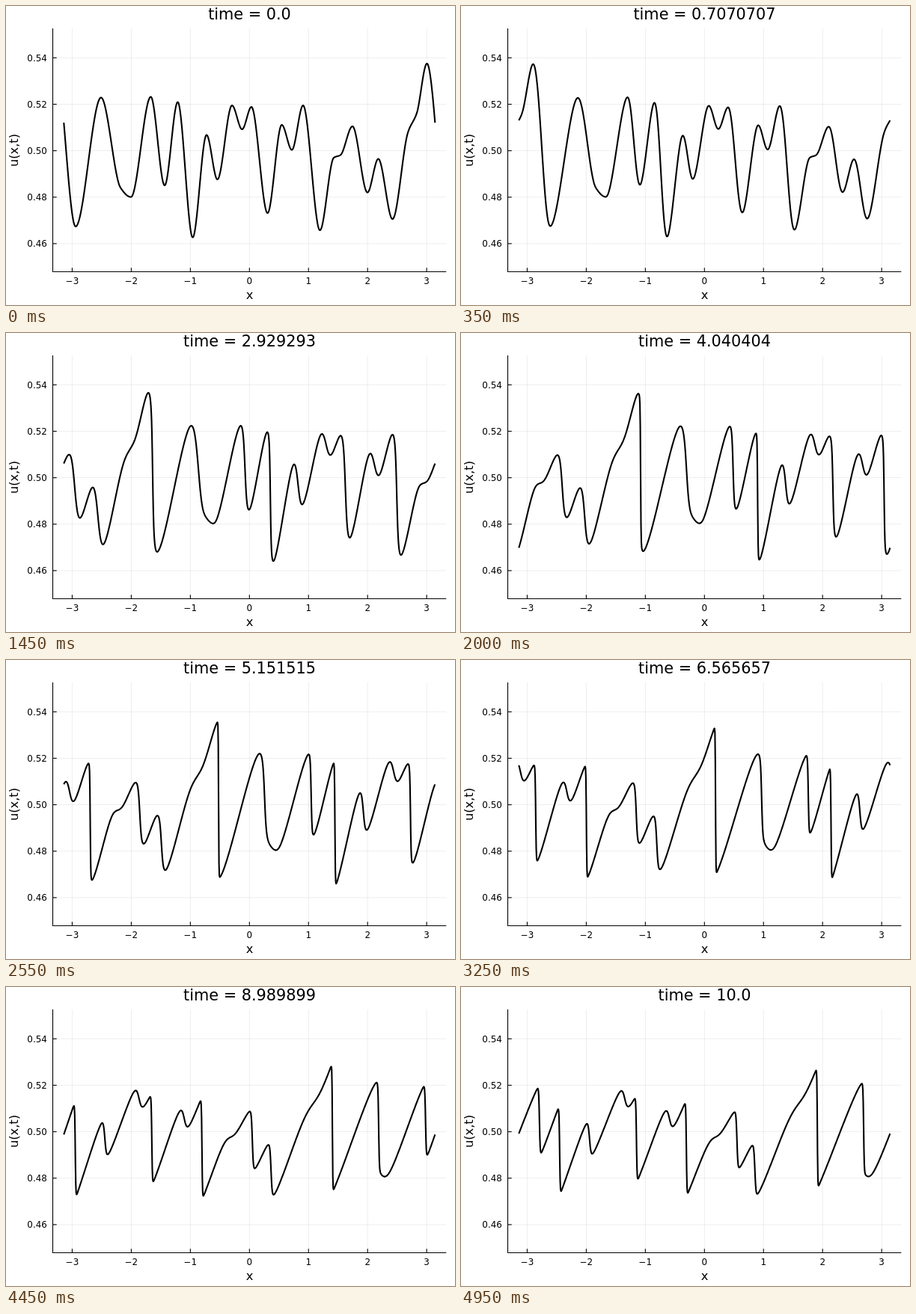
An HTML page for the animation above (5000 ms loop, 600x400 px).

```html
<!DOCTYPE html>
<html lang="en">
<head>
<meta charset="utf-8">
<title>Travelling wave</title>
<style>
  html, body { margin: 0; width: 100%; height: 100%; overflow: hidden; background: #fff; }
  svg { display: block; width: 600px; height: 400px; }
  text { font-family: "DejaVu Sans", sans-serif; font-size: 11.9px; fill: #000; }
  .mid { text-anchor: middle; }
  .end { text-anchor: end; }
  #title { font-size: 20.8px; }
  .label { font-size: 16.3px; }
</style>
</head>
<body>
<svg viewBox="0 0 600 400">
  <rect width="600" height="400" fill="#fff"/>
  <g id="grid" stroke="#000" stroke-opacity="0.1" stroke-width="0.7"></g>
  <g id="axes" stroke="#000" stroke-width="1.1"></g>
  <g id="ticks"></g>
  <text id="title" class="mid" x="325.5" y="18"></text>
  <text class="label mid" x="325.5" y="392">x</text>
  <text class="label mid" transform="translate(16 193) rotate(-90)">u(x,t)</text>
  <path id="wave" fill="none" stroke="#000" stroke-width="2.1" stroke-linejoin="round"/>
</svg>
<script>
const NS = "http://www.w3.org/2000/svg";
const $ = id => document.getElementById(id);

const SX = 78.95, SY = 3107.5, X0 = 325.3, Y0 = 193.6;
const px = x => X0 + SX * x;
const py = u => Y0 - SY * (u - 0.5);

function add(parent, tag, attrs, text) {
  const el = document.createElementNS(NS, tag);
  for (const k in attrs) el.setAttribute(k, attrs[k]);
  if (text) el.textContent = text;
  $(parent).appendChild(el);
}
const line = (parent, x1, y1, x2, y2) => add(parent, "line", { x1, y1, x2, y2 });

for (let v = -3; v <= 3; v++) {
  const x = px(v);
  line("grid", x, 30, x, 355.5);
  line("axes", x, 355.5, x, 350.3);
  add("ticks", "text", { x, y: 371.6, class: "mid" }, String(v).replace("-", "\u2212"));
}
for (let i = 0; i < 5; i++) {
  const u = 0.46 + 0.02 * i, y = py(u);
  line("grid", 62.5, y, 588.3, y);
  line("axes", 62.5, y, 67.7, y);
  add("ticks", "text", { x: 54.8, y: y + 4.3, class: "end" }, u.toFixed(2));
}
line("axes", 62.5, 30, 62.5, 356);
line("axes", 62, 355.5, 588.3, 355.5);

// Crests, troughs and shelves of the starting wave, in stage pixels
const LEFT = px(-Math.PI), PERIOD = 2 * Math.PI * SX;
const turns = [
  [93, 295], [127, 122.5], [153, 243], [167, 255.5], [193.5, 121.5], [212, 240],
  [229.5, 128.5], [249.5, 309.5], [268, 172.5], [282.5, 232], [302, 133], [315.5, 165],
  [328, 135], [349.5, 277], [368.5, 159], [382, 192.5], [397, 133], [419.5, 300],
  [438, 203], [447, 199.3], [463, 161], [483, 249.5], [497.5, 204.5], [516.5, 285],
  [537, 169.5], [549, 143], [562.5, 77]
];

// Periodic cubic curve: level at turning points, harmonic mean slope elsewhere
function smooth(pts, period) {
  const n = pts.length;
  const next = i => i < n - 1 ? pts[i + 1] : [pts[0][0] + period, pts[0][1]];
  const rise = pts.map((p, i) => (next(i)[1] - p[1]) / (next(i)[0] - p[0]));
  const slope = rise.map((b, i) => {
    const a = rise[(i + n - 1) % n];
    return a * b > 0 ? 2 * a * b / (a + b) : 0;
  });
  return x => {
    if (x < pts[0][0]) x += period;
    let i = n - 1;
    while (pts[i][0] > x) i--;
    const [xa, ya] = pts[i], [xb, yb] = next(i);
    const h = xb - xa, s = (x - xa) / h, r = 1 - s;
    return ya * r * r * (1 + 2 * s) + yb * s * s * (1 + 2 * r)
      + h * s * r * (slope[i] * r - slope[(i + 1) % n] * s);
  };
}

// Viscous Burgers flow u_t + u u_x = NU u_xx, solved by the Cole-Hopf formula
const NU = 1e-4, N = 2048, STEP = 2 * Math.PI / N;
const shape = smooth(turns, PERIOD);
const w0 = Array.from({ length: N }, (_, i) => (Y0 - shape(LEFT + i * PERIOD / N)) / SY);
const mean = w0.reduce((a, b) => a + b) / N;
const potential = [];
let sum = 0;
for (let i = 0; i < N; i++) w0[i] -= mean;
for (let i = 0; i < N; i++) {
  sum += (w0[i] + w0[(i + N - 1) % N]) / 2 * STEP;
  potential[i] = sum;
}
const wrap = i => ((i % N) + N) % N;

function height(pos, t) {
  const base = 0.5 + mean;
  if (t === 0) return base + w0[wrap(pos)];
  const c = pos - base * t / STEP;
  const reach = (0.042 * t + 7 * Math.sqrt(2 * NU * t)) / STEP;
  let top = 0, bottom = 0;
  for (let j = Math.ceil(c - reach); j <= c + reach; j++) {
    const k = wrap(j), gap = (c - j) * STEP;
    const e = Math.exp(-(potential[k] + gap * gap / (2 * t)) / (2 * NU));
    top += w0[k] * e;
    bottom += e;
  }
  return base + top / bottom;
}

function wavePath(t) {
  const pts = [];
  for (let i = 0; i <= N; i += 2) {
    pts.push((LEFT + i * PERIOD / N).toFixed(2) + " " + py(height(i, t)).toFixed(2));
  }
  return "M" + pts.join("L");
}

// Shortest decimal within single-precision rounding
function single(v) {
  const f = Math.fround(v);
  let p = 1;
  while (Math.abs(+f.toPrecision(p) - f) > f * 2 ** -24) p++;
  const s = String(+f.toPrecision(p));
  return s.includes(".") ? s : s + ".0";
}

const STEPS = 100, HOLD = 50, paths = [];
let shown = -1;

function draw(ms) {
  const i = Math.floor(ms / HOLD) % STEPS;
  if (i === shown) return;
  shown = i;
  const t = 10 * i / (STEPS - 1);
  $("wave").setAttribute("d", paths[i] || (paths[i] = wavePath(t)));
  $("title").textContent = "time = " + single(t);
}

const start = performance.now();
function tick() {
  draw(performance.now() - start);
  requestAnimationFrame(tick);
}
tick();
</script>
</body>
</html>
```
